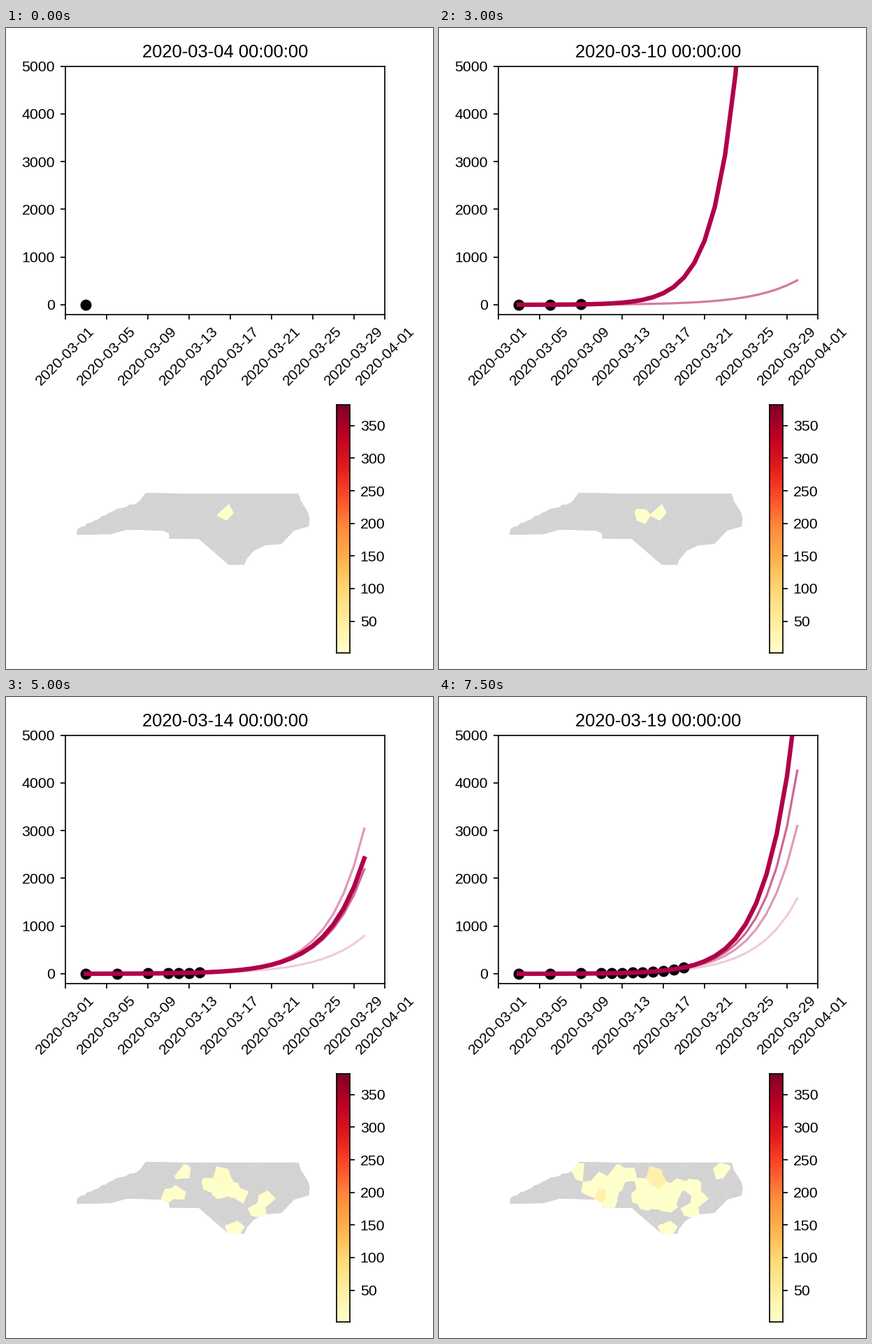
Recreate the animation shown at these times as a matplotlib script. Size 611 by 917 pixels, loop 8 s.

```python
import numpy as np
import matplotlib.pyplot as plt
from matplotlib.animation import FuncAnimation
from matplotlib.colors import Normalize
from matplotlib.patches import Polygon

W, H, DPI = 611, 917, 128
PT = 152.8 / DPI        # scale for point sizes
FIRST_DAY, LAST_DAY = 4, 19
RASPBERRY, GREY, SEAM = "#b00149", "#d3d3d3", "#d9d9d9"

plt.rcParams.update({
    "font.family": "Liberation Sans", "font.size": 10 * PT,
    "axes.linewidth": 0.8 * PT,
})
fig = plt.figure(figsize=(W / DPI, H / DPI), dpi=DPI, facecolor="white")
cmap = plt.get_cmap("YlOrRd")
norm = Normalize(1, 382)
rng = np.random.default_rng(4)

# Days of March with new reports, and the running total
case_days = np.array([3, 6, 9, *range(11, 20)])
totals = np.array([1, 2, 8, 9, 16, 19, 26, 33, 41, 65, 91, 134])
span = np.arange(3, 31)


def fit_curve(day):
    """Least-squares exponential through the totals known on a day."""
    seen = case_days <= day
    t, y = case_days[seen] - 3, totals[seen]
    if len(t) < 2:
        return np.full(len(span), np.nan)
    rate, log_a = np.polyfit(t, np.log(y), 1, w=y)
    a = np.exp(log_a)
    for _ in range(40):
        e = np.exp(rate * t)
        jac = np.column_stack([e, a * t * e])
        step = np.linalg.lstsq(jac, y - a * e, rcond=None)[0]
        a, rate = a + step[0], rate + step[1]
    return a * np.exp(rate * (span - 3))


curves = {day: fit_curve(day) for day in range(1, LAST_DAY + 1)}


def panel(left, top, right, bottom):
    ax = fig.add_axes([left / W, 1 - bottom / H,
                       (right - left) / W, (bottom - top) / H])
    ax.tick_params(length=3.5 * PT, width=0.8 * PT, pad=3.5 * PT)
    return ax


# Map, drawn in pixel coordinates
land = fig.add_axes([0, 0, 1, 1])
land.set(xlim=(0, W), ylim=(H, 0))
land.axis("off")

ridge_x = np.linspace(102, 192, 19)
ridge_y = np.interp(ridge_x, [102, 127, 152, 192], [716, 705, 691, 677])
ridge = np.column_stack([ridge_x, ridge_y + rng.uniform(-1.5, 1.5, 19)])
border = [(200, 665), (250, 666), (418.5, 666), (422, 677), (432, 693),
          (434.5, 702), (433, 713), (412, 719), (394, 738), (371, 740),
          (354, 748), (344, 760), (341, 768), (319, 768), (276, 731),
          (234, 730.5), (233, 723), (225, 719), (173, 717.5), (150, 724),
          (101.5, 725)]
state = land.add_patch(Polygon([*ridge, *border], fc=GREY, lw=0))

# Centres of the regions, by the day of their first case
hits = {
    3: [(315, 694)],
    6: [(290, 698)],
    11: [(306, 684), (326, 704)],
    12: [(234, 713), (254, 682), (244, 711), (361, 735)],
    13: [(307, 710), (337, 711), (329, 759)],
    14: [(371, 719)],
    15: [(199, 678), (342, 698)],
    16: [(231, 694), (326, 728)],
    17: [(272, 684)],
    18: [(255, 695), (243, 725), (284, 714), (310, 723), (362, 702),
         (405, 676)],
    19: [(217, 706), (296, 724)],
}
HUBS = [hits[day][0] for day in (3, 11, 12)]
starts = {site: day for day, group in hits.items() for site in group}

# Quiet regions fill the space between
sites = list(starts)
for spot in rng.uniform((95, 655), (445, 778), (5000, 2)):
    if np.hypot(*(np.array(sites) - spot).T).min() > 15:
        sites.append(tuple(spot))


def cell(site):
    """Voronoi cell: a square cut by the bisector to each neighbour."""
    site = np.array(site)
    poly = [site + 22 * np.array(c) for c in
            ((-1, -1), (1, -1), (1, 1), (-1, 1))]
    for other in np.array(sites):
        axis = other - site
        if not 0 < np.hypot(*axis) < 62:
            continue
        limit = axis @ (site + other) / 2
        cut = []
        for p, q in zip(poly, poly[1:] + poly[:1]):
            dp, dq = axis @ p - limit, axis @ q - limit
            if dp <= 0:
                cut.append(p)
            if dp * dq < 0:
                cut.append(p + (q - p) * dp / (dp - dq))
        poly = cut
    return poly


regions = []
for site in sites:
    patch = land.add_patch(Polygon(cell(site), fc=GREY, ec=SEAM, lw=0.4))
    patch.set_clip_path(state)
    if site in starts:
        regions.append((patch, starts[site], site in HUBS))

# Colour bar
bar = panel(473.2, 538.9, 491.9, 894.3)
bar.imshow(np.linspace(0, 1, 256)[:, None], cmap=cmap, origin="lower",
           extent=(0, 1, 1, 382), aspect="auto", interpolation="nearest")
bar.set(xticks=[], yticks=range(50, 400, 50))
bar.yaxis.tick_right()

# Case chart; x is the day counted from March 1
chart = panel(84.8, 54.6, 542.2, 409.6)
chart.set(xlim=(1, 32), ylim=(-200, 5000), yticks=range(0, 5001, 1000))
tick_days = [*range(1, 30, 4), 32]
labels = [f"2020-03-{d:02d}" for d in tick_days[:-1]] + ["2020-04-01"]
chart.set_xticks(tick_days, labels, rotation=45)
title = chart.set_title("", fontsize=12 * PT, pad=6 * PT)

dots = chart.scatter([], [], s=(6 * PT) ** 2, color="black",
                     linewidths=1.5 * PT, zorder=2)
trails = [chart.plot([], [], color=RASPBERRY, lw=1.5 * PT, alpha=a,
                     zorder=2.2)[0] for a in (0.2, 0.4, 0.6)]
current, = chart.plot([], [], color=RASPBERRY, lw=3 * PT, zorder=2.4)


def update(i):
    day = FIRST_DAY + i
    title.set_text(f"2020-03-{day:02d} 00:00:00")
    seen = case_days <= day
    dots.set_offsets(np.column_stack([case_days[seen], totals[seen]]))
    for back, line in zip((3, 2, 1, 0), [*trails, current]):
        line.set_data(span, curves[day - back])
    for patch, start, hub in regions:
        lit = day >= start
        cases = 0.28 * totals[seen][-1] if hub else 2
        color = cmap(norm(max(cases, 1))) if lit else GREY
        patch.set(facecolor=color, edgecolor=color if lit else SEAM,
                  zorder=3 if lit else 1)
    return [title, dots, current, *trails, *(r[0] for r in regions)]


anim = FuncAnimation(fig, update, frames=LAST_DAY - FIRST_DAY + 1,
                     interval=500, repeat=True, repeat_delay=0, blit=False)
plt.show()
```
